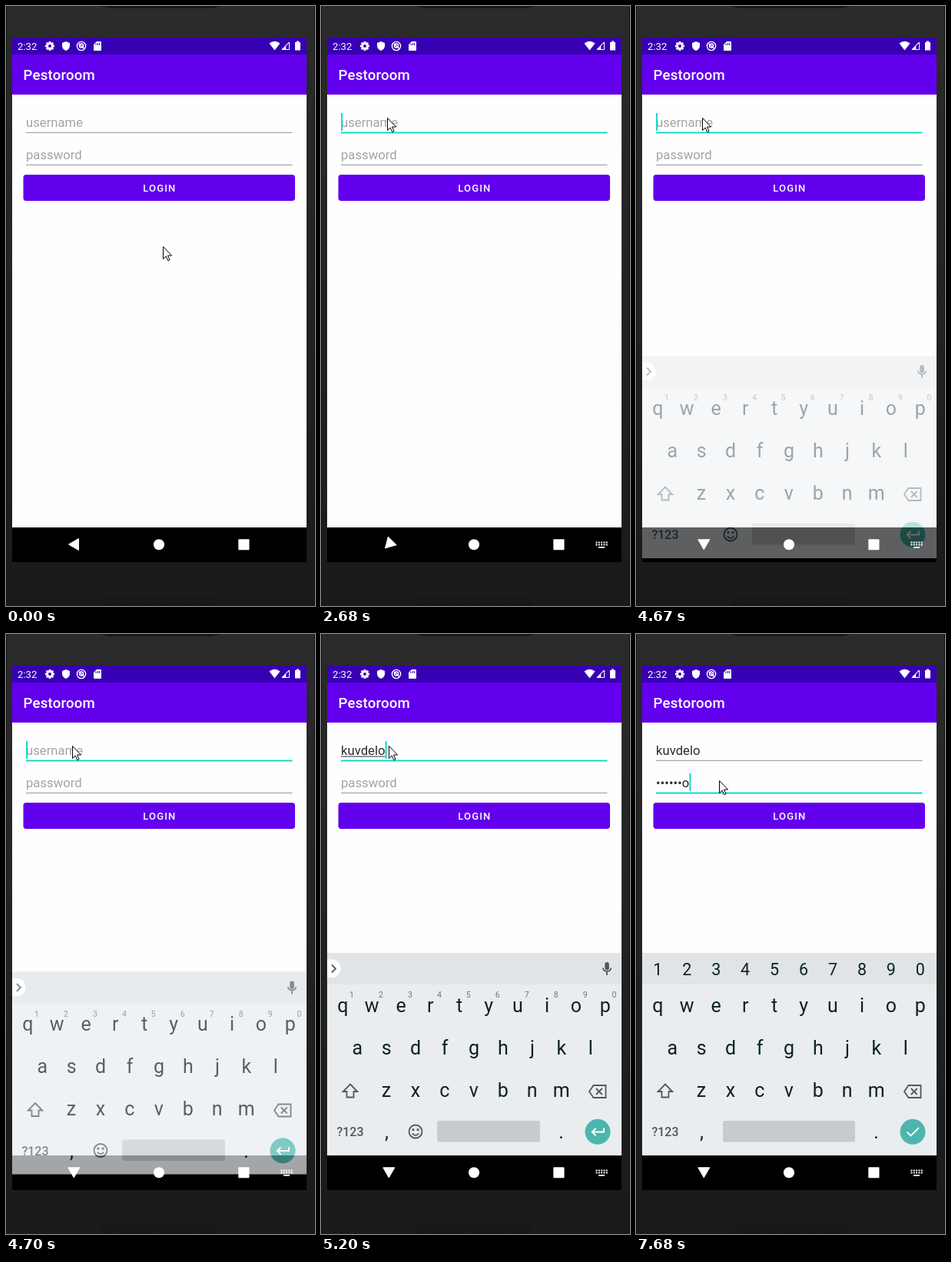
An HTML page for the animation above (8000 ms loop, 402 by 779 pixels).

```html
<!DOCTYPE html>
<html lang="en">
<head>
<meta charset="utf-8">
<title>Login screen</title>
<style>
html, body { margin: 0; width: 100%; height: 100%; overflow: hidden; background: #1d1d1d; }
svg { display: block; width: 402px; height: 779px; font-family: Roboto, sans-serif; }
text { white-space: pre; }
.field { font-size: 16.7px; fill: #2b2b2b; }
.hint { fill: #a3a3a3; }
.keys { font-size: 25px; fill: #0c2129; text-anchor: middle; }
.line { fill: none; stroke: #4c5a61; stroke-width: 1.8; }
</style>
</head>
<body>
<svg viewBox="0 0 402 779">
  <defs>
    <linearGradient id="body" x2="0" y2="1">
      <stop offset="0" stop-color="#2b2b2b"/><stop offset=".5" stop-color="#222"/><stop offset="1" stop-color="#1a1a1a"/>
    </linearGradient>
    <pattern id="mesh" width="4" height="4" patternUnits="userSpaceOnUse">
      <rect width="4" height="4" fill="#202020"/><circle cx="1" cy="1" r="1" fill="#0a0a0a"/><circle cx="3" cy="3" r="1" fill="#0a0a0a"/>
    </pattern>
    <clipPath id="screen"><path d="M8 41H391V722H8Z"/></clipPath>
  </defs>

  <rect width="402" height="779" fill="url(#body)"/>
  <path d="M122 0H280L268 3H134Z" fill="#171717"/>
  <path d="M0 0H1V779H0ZM401 0H402V779H401Z" fill="#151515"/>
  <rect x="123" y="767" width="152" height="18" rx="6" fill="url(#mesh)"/>

  <rect x="8" y="41" width="383" height="22" fill="#3700b3"/>
  <rect x="8" y="63" width="383" height="52" fill="#6200ee"/>
  <rect x="8" y="115" width="383" height="562" fill="#fefefe"/>
  <rect x="8" y="677" width="383" height="45" fill="#000"/>

  <g fill="#fff">
    <text x="15" y="57" font-size="13.2">2:32</text>
    <g id="gear" transform="translate(57 52)"></g>
    <path d="M78 46L83 48V52Q82.500 56.500 78 58Q73.500 56.500 73 52V48Z"/>
    <g fill="none" stroke="#fff">
      <circle cx="98" cy="52" r="5.600" stroke-width="1.400"/>
      <circle cx="98" cy="51.500" r="2.500" stroke-width="1.500"/>
      <path d="M95 49L102 55.500" stroke-width="1.500"/>
    </g>
    <path d="M118 46H123Q124 46 124 47V57Q124 58 123 58H115Q114 58 114 57V50Z"/>
    <path d="M117 48.500V51M119.300 48V51M121.500 48V51" stroke="#3700b3"/>
    <path d="M342.500 48.500Q349.500 43 356.500 48.500L349.500 57.500Z"/>
    <path d="M359 56.500H368.500V47ZM364 56.500H368.500V47L364 51.500Z" fill-rule="evenodd" stroke="#fff"/>
    <path d="M364.500 52L367.700 49V56H364.500Z" fill="#3700b3"/>
    <path d="M378 45.500H381V47H383V57.500H376V47H378Z"/>
    <text x="22.500" y="96" font-size="18.600" font-weight="500" letter-spacing=".23">Pestoroom</text>
  </g>

  <g id="fields"></g>
  <rect x="22.500" y="219" width="353.500" height="34" rx="3.700" fill="#6200ee"/>
  <text x="178.300" y="241" font-size="13" font-weight="500" letter-spacing="1.160" fill="#fff">LOGIN</text>

  <g clip-path="url(#screen)"><g id="keyboard">
    <rect x="8" y="414" width="383" height="263" fill="#e9edf0"/>
    <rect x="8" y="414" width="383" height="41" fill="#e0e4e7"/>
    <g id="letters" class="keys"></g>
    <g id="plainTools">
      <path d="M8 422.500H15A11.800 11.800 0 0 1 15 446H8Z" fill="#fff"/>
      <path class="line" d="M14 429.500L19 434.500L14 439.500" stroke="#333"/>
      <rect x="369.300" y="426" width="5.500" height="10.500" rx="2.750" fill="#4c5a61"/>
      <path class="line" d="M366.800 433.500A5.300 5.300 0 0 0 377.300 433.500M372 439V443" stroke-width="1.500"/>
      <g id="superscripts" text-anchor="middle" font-size="10.500" fill="#6c777c"></g>
      <circle class="line" cx="123" cy="646" r="8.500"/>
      <path class="line" d="M118.800 648.200Q123 653.500 127.200 648.200" />
      <path d="M118.500 642.200h2.800v2.800h-2.800zM124.700 642.200h2.800v2.800h-2.800z" fill="#4c5a61"/>
    </g>
    <g id="numberRow" class="keys" style="font-size:21.500px"></g>
    <path class="line" d="M38 584.500L47.300 594H42.500V601.500H33.500V594H28.700Z"/>
    <path class="line" d="M354.500 586H370.500V602H354.500L349 594ZM357.800 590L365.800 598M365.800 590L357.800 598"/>
    <text x="38" y="652" font-size="16" font-weight="500" fill="#4c5a61" text-anchor="middle">?123</text>
    <rect id="space" y="632" height="27.500" rx="2.500" fill="#c7cbce"/>
    <circle cx="360" cy="646.300" r="16.500" fill="#4db6ac"/>
    <path id="action" fill="none" stroke="#fff" stroke-width="1.900"/>
  </g></g>

  <g fill="#fff">
    <path id="back" d="M81.500 699L94.500 691.500V706.500Z" stroke="#fff" stroke-linejoin="round"/>
    <circle cx="199" cy="699.300" r="7"/>
    <rect x="302.300" y="692.300" width="14.200" height="14" rx="1"/>
    <g id="imeIcon">
      <path d="M357.500 696.500H373M357.500 699.500H373" stroke="#fff" stroke-width="2" stroke-dasharray="2 1.300"/>
      <rect x="361" y="702" width="8" height="1.700"/>
    </g>
  </g>

  <path id="pointer" d="M.5 .5V16.500L4.200 13L6.800 18.700L9 17.700L6.500 12H11.500Z" fill="#fff" stroke="#000" stroke-linejoin="round"/>
</svg>

<script>
const LOOP = 8000;
const NAME = "kuvdelo";
const TEAL = "#03d5c4";
const $ = id => document.getElementById(id);

function add(parent, tag, attrs, content = "") {
  const node = document.createElementNS("http://www.w3.org/2000/svg", tag);
  set(node, attrs);
  node.textContent = content;
  return parent.appendChild(node);
}
function set(node, attrs) {
  for (const key in attrs) node.setAttribute(key, attrs[key]);
}
const show = (node, on) => set(node, { visibility: on ? "visible" : "hidden" });

// Gear: eight teeth around a ring
for (let i = 0; i < 4; i++)
  add($("gear"), "rect", { x: -1.4, y: -6, width: 2.8, height: 12, transform: `rotate(${i * 45})` });
add($("gear"), "circle", { r: 4.5 });
add($("gear"), "circle", { r: 2, fill: "#3700b3" });

function keyRow(parent, chars, x, y) {
  [...chars].forEach((c, i) => add(parent, "text", { x: x + i * 37.95, y }, c));
}
keyRow($("letters"), "qwertyuiop", 28.3, 490.5);
keyRow($("letters"), "asdfghjkl", 47.2, 545.5);
keyRow($("letters"), "zxcvbnm", 85, 600.5);
keyRow($("letters"), ",", 85.5, 655);
keyRow($("letters"), ".", 312.5, 655);
keyRow($("superscripts"), "1234567890", 40, 472);
keyRow($("numberRow"), "1234567890", 28.3, 443);

function makeField(hint, top) {
  const g = $("fields");
  return {
    top,
    hint: add(g, "text", { x: 26, y: top + 18, class: "field hint" }, hint),
    text: add(g, "text", { x: 26, y: top + 18, class: "field" }),
    compose: add(g, "rect", { x: 26, y: top + 19.5, height: 1, fill: "#333" }),
    rule: add(g, "rect", { x: 26, width: 346.5 }),
    caret: add(g, "rect", { y: top, width: 1.8, height: 23, fill: TEAL })
  };
}
const user = makeField("username", 139);
const pass = makeField("password", 181);

function drawField(field, value, focus, caret, composing) {
  field.text.textContent = value;
  const width = value ? field.text.getComputedTextLength() : 0;
  show(field.hint, !value);
  show(field.compose, composing && value);
  show(field.caret, caret);
  set(field.compose, { width });
  set(field.caret, { x: 26.2 + width });
  set(field.rule, focus
    ? { y: field.top + 24.6, height: 1.8, fill: TEAL }
    : { y: field.top + 24.8, height: 1, fill: "#929292" });
}

// Each track is a list of [time, ...values]; the latest reached entry holds
const POINTER = [
  [0, 204, 312], [1060, 199, 340], [1120, 195, 361],
  [1330, 190, 343], [1390, 169, 288], [1450, 141, 226], [1510, 113, 174],
  [1570, 95, 143], [1630, 88, 132], [1660, 88, 134], [1690, 88, 137],
  [1780, 88, 142], [1870, 88, 146], [2110, 87, 146], [2170, 86, 145],
  [5140, 87, 145], [5200, 88, 145], [5550, 93, 158], [5600, 102, 180],
  [5660, 106, 189], [6330, 108, 189], [6580, 108, 190]
];
const SLIDE = [
  [0, 60, 0], [4670, 40, 0.4], [4700, 24.5, 0.7], [4760, 9, 0.9], [4820, 0, 1]
];
const CARET = [
  [0, 0], [2290, 1], [2740, 0], [3190, 1], [3650, 0], [4110, 1],
  [5600, 0], [5930, 1], [6420, 0], [6580, 1]
];
const USER_KEYS = [4820, 4880, 4940, 5000, 5060, 5140, 5200];
const PASS_KEYS = [6580, 6700, 6880, 7160, 7280, 7460, 7680];

const at = (track, t) => track.findLast(step => step[0] <= t).slice(1);
const typed = (times, t) => times.filter(time => time <= t).length;

function draw(t) {
  const inPass = t >= 5870;
  const focused = t >= 2170;
  const [caret] = at(CARET, t);
  const count = typed(PASS_KEYS, t);
  const secret = count ? "•".repeat(count - 1) + NAME[count - 1] : "";
  drawField(user, NAME.slice(0, typed(USER_KEYS, t)), focused && !inPass, caret && !inPass, t < 5810);
  drawField(pass, secret, inPass, caret && inPass, false);

  const [shift, alpha] = at(SLIDE, t);
  set($("keyboard"), { transform: `translate(0 ${shift})`, opacity: alpha });
  const secure = t >= 6580;
  show($("plainTools"), !secure);
  show($("numberRow"), secure);
  set($("space"), secure ? { x: 113, width: 172 } : { x: 151, width: 134 });
  set($("action"), { d: secure
    ? "M352.500 646.500L357.500 651.500L368 641"
    : "M368 641.500V646.500H353M357.500 641.800L352.700 646.500L357.500 651.200" });

  const turn = Math.min(1, Math.max(0, (t - 2560) / 240));
  const eased = (1 - Math.cos(Math.PI * turn)) / 2;
  set($("back"), { transform: `rotate(${-90 * eased} 88.3 699)` });
  show($("imeIcon"), t >= 2620);

  const [x, y] = at(POINTER, t);
  set($("pointer"), { transform: `translate(${x} ${y})` });
}

const start = performance.now();
function frame() {
  draw((performance.now() - start) % LOOP);
  requestAnimationFrame(frame);
}
frame();
</script>
</body>
</html>
```
